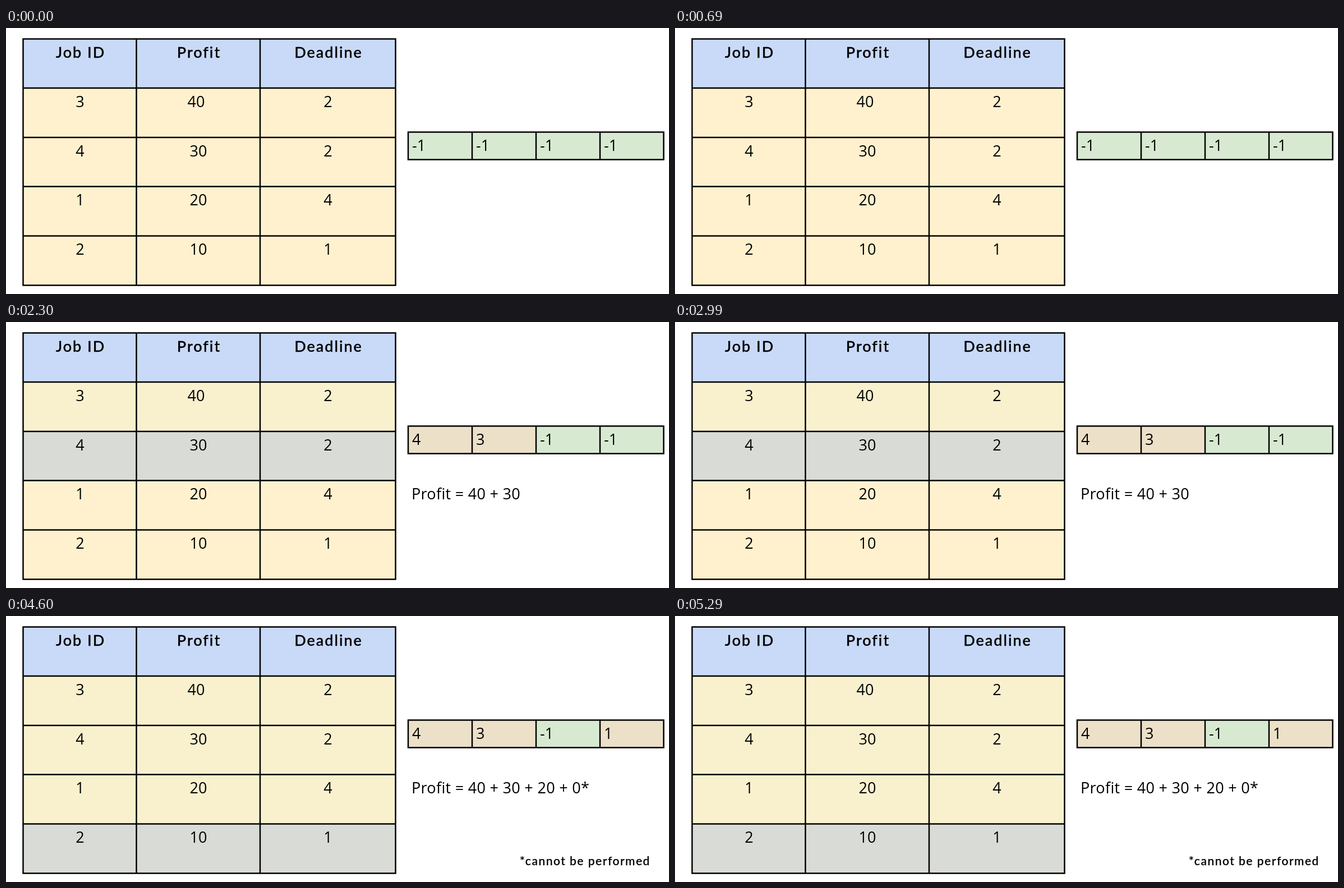
Write an HTML page that moves like this. It is 1182 px wide and 474 px high and loops after 5.75 s.

```html
<!DOCTYPE html>
<html lang="en">
<head>
<meta charset="utf-8">
<title>Job scheduling by profit</title>
<style>
  html, body { margin: 0; width: 100%; height: 100%; overflow: hidden; background: #fff; }
  svg { display: block; width: 1182px; height: 474px; }
  text { font: 500 27px "Open Sans", "Noto Sans", sans-serif; fill: #000; }
  .head { font-family: Lato, sans-serif; text-anchor: middle; letter-spacing: 2px; stroke: #000; stroke-width: .35px; }
  .cell { text-anchor: middle; }
  .sum { letter-spacing: .3px; }
  .note { font: 500 21px Lato, sans-serif; letter-spacing: 1.5px; stroke: #000; stroke-width: .25px; }
  path { fill: none; stroke: #000; stroke-width: 2.5px; stroke-linecap: square; }
</style>
</head>
<body>
<svg viewBox="0 0 1182 474"></svg>
<script>
const STEP_MS = 1150, STEPS = 5;
const COLORS = {
  head: '#c9daf8', waiting: '#fff1ce', active: '#d9dcd6', done: '#f9f1ce',
  free: '#d8e9d2', taken: '#ece0c8'
};
const colX = [30.5, 232.5, 453, 694.5];
const rowY = [19.5, 107, 195, 282.5, 370.5, 458.5];
const slotX = [717, 831, 945, 1059, 1172.5];
const slotY = [185.5, 234.5];
const jobs = [[3, 40, 2], [4, 30, 2], [1, 20, 4], [2, 10, 1]];
// Each slot names its job and the step at which it is taken.
const slots = [{ job: 4, step: 2 }, { job: 3, step: 1 }, { job: null, step: Infinity }, { job: 1, step: 3 }];
const terms = ['40', '30', '20', '0*'];

const svg = document.querySelector('svg');

function add(tag, attrs, content = '') {
  const node = document.createElementNS('http://www.w3.org/2000/svg', tag);
  for (const key in attrs) node.setAttribute(key, attrs[key]);
  node.textContent = content;
  return svg.appendChild(node);
}

const box = (x1, y1, x2, y2, fill) =>
  add('rect', { x: x1, y: y1, width: x2 - x1, height: y2 - y1, fill });

const label = (x, y, cls, content) => add('text', { x, y, class: cls }, content);

function grid(xs, ys) {
  const across = ys.map(y => `M${xs[0]} ${y}H${xs.at(-1)}`);
  const down = xs.map(x => `M${x} ${ys[0]}V${ys.at(-1)}`);
  add('path', { d: across.concat(down).join('') });
}

box(colX[0], rowY[0], colX[3], rowY[1], COLORS.head);
const rowBoxes = jobs.map((_, i) => box(colX[0], rowY[i + 1], colX[3], rowY[i + 2], COLORS.waiting));
const slotBoxes = slots.map((_, i) => box(slotX[i], slotY[0], slotX[i + 1], slotY[1], COLORS.free));
grid(colX, rowY);
grid(slotX, slotY);

const centers = [132, 343, 574];
['Job ID', 'Profit', 'Deadline'].forEach((title, c) => label(centers[c] + 1, 53, 'head', title));
jobs.forEach((job, r) => job.forEach((value, c) =>
  label(value === 40 ? 339 : centers[c], rowY[r + 1] + 33.5, 'cell', value)));

const slotLabels = slots.map((_, i) => label(slotX[i] + 7, 219, 'slot', '-1'));
const sum = label(723, 316, 'sum');
const note = label(916, 444, 'note', '*cannot be performed');

function render(step) {
  rowBoxes.forEach((rect, i) => {
    const state = i + 1 === step ? 'active' : i + 1 < step ? 'done' : 'waiting';
    rect.setAttribute('fill', COLORS[state]);
  });
  slots.forEach((slot, i) => {
    const taken = step >= slot.step;
    slotBoxes[i].setAttribute('fill', taken ? COLORS.taken : COLORS.free);
    slotLabels[i].textContent = taken ? slot.job : '-1';
  });
  sum.textContent = step ? 'Profit = ' + terms.slice(0, step).join(' + ') : '';
  note.setAttribute('visibility', step === STEPS - 1 ? 'visible' : 'hidden');
}

let shown = -1;
function tick() {
  const step = Math.floor(performance.now() / STEP_MS) % STEPS;
  if (step !== shown) render(shown = step);
  requestAnimationFrame(tick);
}
tick();
</script>
</body>
</html>
```
